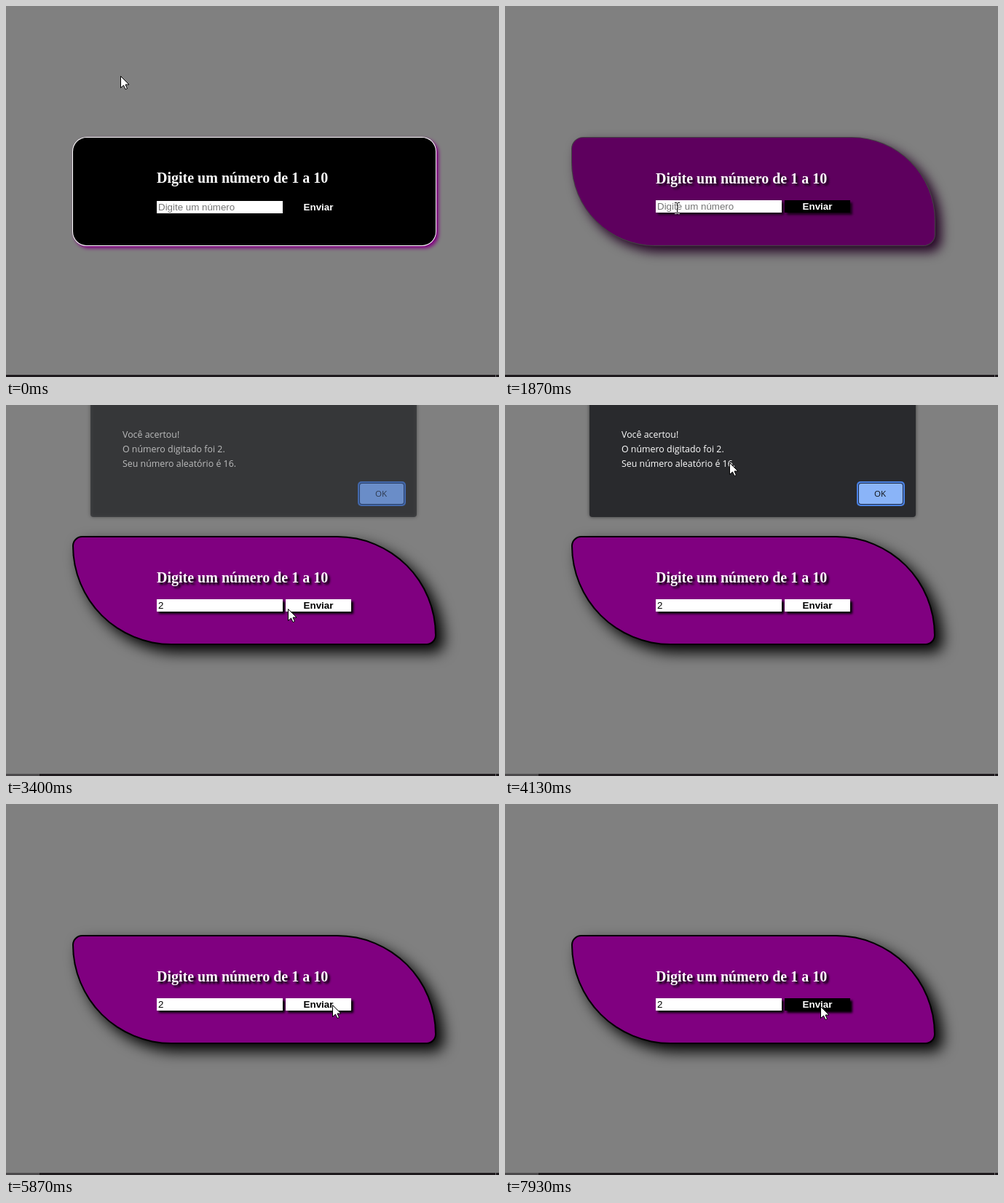
An HTML page with a canvas that plays this animation: 677 px wide and 510 px high, repeating every 8000 ms.

```html
<!DOCTYPE html>
<html lang="pt">
<head>
<meta charset="utf-8">
<title>Digite um número</title>
<style>
  html, body { margin: 0; width: 100%; height: 100%; overflow: hidden; background: #808080; }
  canvas { display: block; }
</style>
</head>
<body>
<canvas id="stage" width="677" height="510"></canvas>
<script>
const ctx = document.getElementById('stage').getContext('2d');
const LOOP = 8000, STEP = 1000 / 15;
const SANS = '"Liberation Sans", Arial, sans-serif';
const SERIF = '"Liberation Serif", "Times New Roman", serif';
const UI = '"Open Sans", "Noto Sans", sans-serif';
const ARROW = new Path2D('M.5 .5v16l4-3.5 2.5 5.5 2.5-1-2.5-5.5h5z');

// pointer moves: it rests between them
const START = { x: 157, y: 96 };
const MOVES = [
  { from: 1020, to: 1866, x: 236, y: 278 },
  { from: 2380, to: 2733, x: 387, y: 280 },
  { from: 3680, to: 4133, x: 308, y: 79 },
  { from: 4350, to: 4667, x: 514, y: 122 },
  { from: 4830, to: 5667, x: 448, y: 276 },
  { from: 6130, to: 6800, x: 302, y: 80 },
  { from: 6866, to: 7200, x: 514, y: 122 },
  { from: 7270, to: 7733, x: 433, y: 278 }
];
// the pointer enters and leaves the card in turn
const CROSSINGS = [1430, 4870, 5170, 7330, 7430];
const ALERTS = [
  { press: 3260, open: 3200, close: 4667, value: 16 },
  { press: 5860, open: 6000, close: 7200, value: 12 }
];
const FOCUS = 2000, TASK_ON = 2200, TYPED = 2395, CARET_OFF = 2930;

const clamp = v => Math.max(0, Math.min(1, v));
const mix = (a, b, p) => a + (b - a) * p;
const rgb = (a, b, p) => `rgb(${a.map((v, i) => Math.round(mix(v, b[i], p))).join(',')})`;
const within = (v, a, b) => v >= a && v < b;
const smooth = u => u * u * (3 - 2 * u);

// CSS "ease": cubic-bezier(.25, .1, .25, 1)
function ease(x) {
  if (x <= 0 || x >= 1) return clamp(x);
  const bez = (s, a, b) => 3 * s * (1 - s) * (1 - s) * a + 3 * s * s * (1 - s) * b + s * s * s;
  let lo = 0, hi = 1;
  for (let i = 0; i < 24; i++) {
    const mid = (lo + hi) / 2;
    if (bez(mid, .25, .25) < x) lo = mid; else hi = mid;
  }
  return bez(lo, .1, 1);
}

// reversed transitions last as long as the distance left
function hoverAt(t) {
  let from = 0, to = 0, start = 0, span = 1000;
  const value = now => mix(from, to, ease((now - start) / span));
  for (const at of CROSSINGS) {
    if (at > t) break;
    from = value(at);
    to = 1 - to;
    start = at;
    span = Math.max(1, Math.abs(to - from) * 1000);
  }
  return value(t);
}

function pointerAt(t) {
  let { x, y } = START;
  for (const m of MOVES) {
    const s = smooth(clamp((t - m.from) / (m.to - m.from)));
    x = mix(x, m.x, s);
    y = mix(y, m.y, s);
  }
  return [Math.round(x), Math.round(y)];
}

function shadow(color, offset = 0, blur = 0) {
  ctx.shadowColor = color;
  ctx.shadowOffsetX = ctx.shadowOffsetY = offset;
  ctx.shadowBlur = blur;
}
const noShadow = () => shadow('transparent');

function rect(x, y, w, h, color) {
  ctx.fillStyle = color;
  ctx.fillRect(x, y, w, h);
}

function round(x, y, w, h, radii, color) {
  ctx.fillStyle = color;
  ctx.beginPath();
  ctx.roundRect(x, y, w, h, radii);
  ctx.fill();
}

function text(str, x, y, font, color) {
  ctx.font = font;
  ctx.fillStyle = color;
  ctx.fillText(str, x, y);
}

function drawCard(p) {
  let small = mix(20, 15, p), big = mix(20, 150, p);
  const fit = Math.min(1, 150 / (small + big)), bw = p >= 1 ? 2 : 1;
  small *= fit;
  big *= fit;
  shadow(rgb([128, 0, 128], [0, 0, 0], p), mix(3, 10, p), mix(5, 20, p));
  round(91, 180, 500, 150, [small, big, small, big], rgb([255, 255, 255], [0, 0, 0], p));
  noShadow();
  round(91 + bw, 180 + bw, 500 - 2 * bw, 150 - 2 * bw,
    [small - bw, big - bw, small - bw, big - bw], rgb([0, 0, 0], [128, 0, 128], p));
}

function drawForm(t, p, pressed) {
  const moved = p > .5 ? 1 : 0, y = 268 - moved, typed = t >= TYPED;
  shadow(`rgba(0,0,0,${p})`, 3, 3);
  text('Digite um número de 1 a 10', 207, 243 + moved, `bold 20px ${SERIF}`, '#fff');
  rect(207, y, 173, 17, '#fff');
  rect(384, y, 90, 17, pressed ? '#fff' : '#000');
  noShadow();
  text(typed ? '2' : 'Digite um número', 209, y + 13, `13.333px ${SANS}`, typed ? '#000' : '#757575');
  if (within(t, FOCUS, CARET_OFF)) rect(typed ? 216 : 209, y + 1, 1, 15, '#000');
  text('Enviar', 408.6, y + 13, `bold 13.333px ${SANS}`, pressed ? '#000' : '#fff');
}

function drawAlert(alpha, value) {
  ctx.save();
  ctx.globalAlpha = alpha;
  shadow('rgba(0,0,0,.55)', 0, 5);
  round(116, -10, 448, 164, 4, '#292a2d');
  noShadow();
  const lines = ['Você acertou!', 'O número digitado foi 2.', `Seu número aleatório é ${value}.`];
  lines.forEach((line, i) => text(line, 160, 45 + 20 * i, `12.4px ${UI}`, '#fff'));
  round(483, 105, 66, 34, 5, '#4a82e4');
  round(485, 107, 62, 30, 4, '#1f2c47');
  round(486, 108, 60, 28, 3, '#8ab4f8');
  text('OK', 507, 126, `11.6px ${UI}`, '#101114');
  ctx.restore();
}

function drawArrow(x, y) {
  ctx.save();
  ctx.translate(x, y);
  ctx.fillStyle = '#fff';
  ctx.fill(ARROW);
  ctx.strokeStyle = '#000';
  ctx.stroke(ARROW);
  ctx.restore();
}

function drawBeam(x, y) {
  ctx.save();
  ctx.globalCompositeOperation = 'difference';
  rect(x, y - 7, 1, 14, '#fff');
  for (const end of [y - 8, y + 7]) {
    rect(x - 3, end, 3, 1, '#fff');
    rect(x + 1, end, 3, 1, '#fff');
  }
  ctx.restore();
}

function drawBar(t) {
  rect(0, 507, 677, 3, '#1e1a1d');
  if (t >= TASK_ON) rect(0, 507, 46, 3, '#4c4a4c');
  rect(672, 507, 1, 3, '#6c6a6c');
}

function draw(t) {
  const p = hoverAt(t);
  const pressed = ALERTS.some(a => within(t, a.press, a.close + 100));
  rect(0, 0, 677, 510, '#808080');
  drawCard(p);
  drawForm(t, p, pressed);
  drawBar(t);

  let covered = false;
  for (const a of ALERTS) {
    const alpha = Math.min(clamp((t - a.open) / 300), 1 - clamp((t - a.close) / 200));
    if (alpha <= 0) continue;
    covered = true;
    drawAlert(alpha, a.value);
  }

  const [x, y] = pointerAt(t);
  const overField = within(x, 207, 380) && within(y, 267, 285);
  const overTitle = within(x, 207, 442) && within(y, 227, 249);
  if (!covered && (overField || overTitle)) drawBeam(x, y);
  else drawArrow(x, y);
}

const begin = performance.now();
function tick() {
  const t = (performance.now() - begin) % LOOP;
  draw(Math.floor((t + 4) / STEP) * STEP % LOOP);
  requestAnimationFrame(tick);
}
tick();
</script>
</body>
</html>
```
